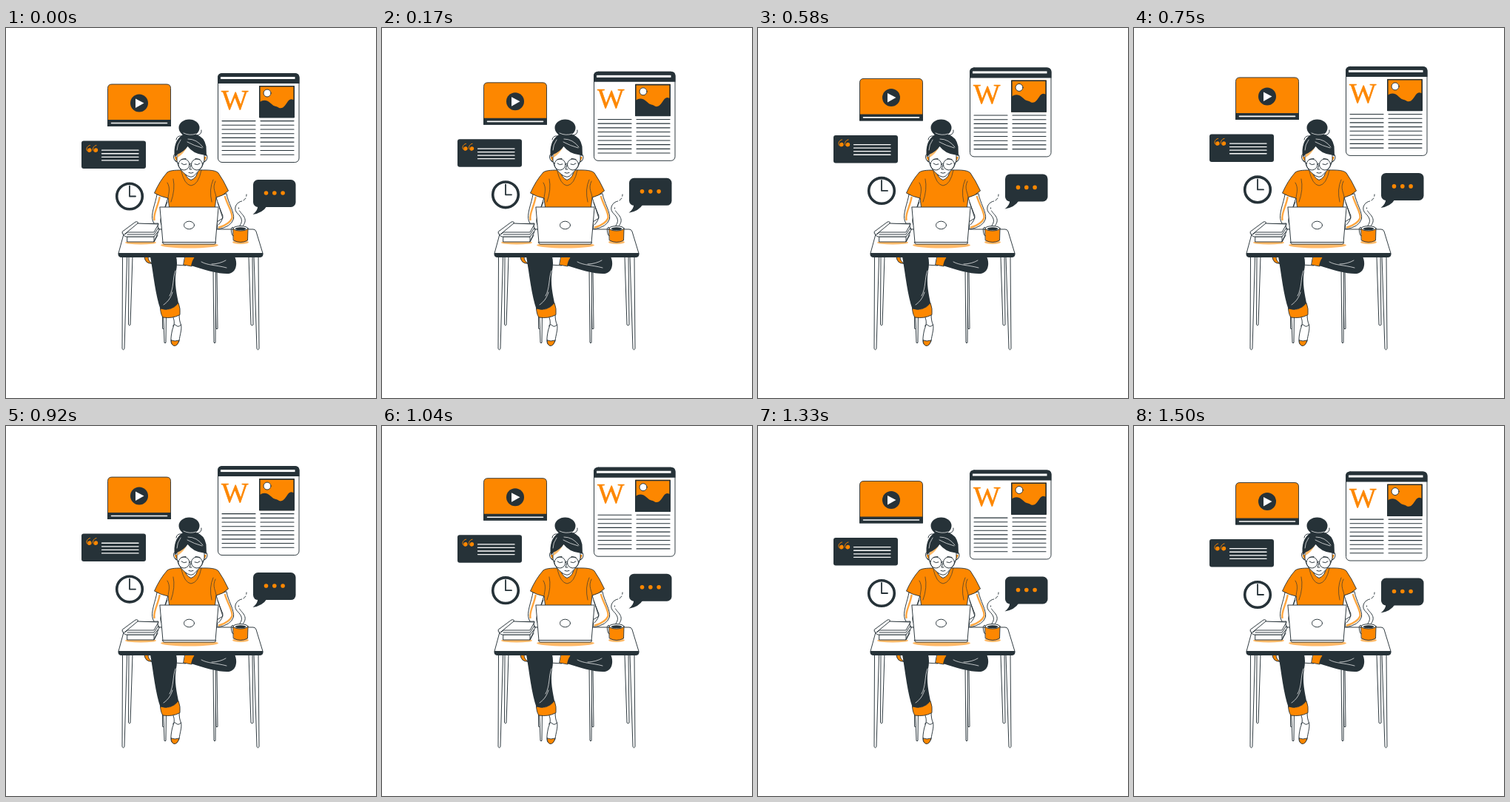
Animation of 500x500 px, one loop 1.54 s. Source, as an HTML page:

```html
<!DOCTYPE html>
<html lang="en">
<head>
<meta charset="utf-8">
<title>Working at a desk</title>
<style>
  html, body { margin: 0; width: 100%; height: 100%; overflow: hidden; background: #fff }
  svg { display: block; width: 100vw; height: 100vh; stroke-linecap: round; stroke-linejoin: round }
  .ink { fill: none; stroke: #263238; stroke-width: .95 }
  .thin { fill: none; stroke: #263238; stroke-width: .65 }
  .paper { fill: #fff; stroke: #263238; stroke-width: .95 }
  .fill { fill: #fd8700; stroke: #263238; stroke-width: .9 }
  .orange { fill: #fd8700 }
  .dark { fill: #263238 }
  .shade { fill: #ffb968 }
  .glow { fill: none; stroke: #ffa640; stroke-width: 2.4 }
  .light { fill: none; stroke: #fff; stroke-width: .7 }
  .white { fill: #fff }
</style>
</head>
<body>
<svg viewBox="0 0 500 500">
  <!-- table and chair legs -->
  <path class="paper" d="M166 309L165.500 401Q166.500 403 168 401L171 309M328 309L331 401Q332.500 403 334 401L333 309
    M211.500 380V406Q212.500 408 213.500 406L215 380M282 325L284 406Q285 408 286 406L285 325"/>
  <path class="paper" d="M212.500 380L214 425Q215 427 216 425L216.500 380M280 325L281 425Q282 427 283 425L283.500 325"/>
  <path class="paper" d="M157.500 309L157 433.500Q158.500 436 160 433.500L163.500 309M335 309L339 433.500Q340.500 436 342 433.500L341 309"/>

  <!-- legs -->
  <path class="paper" d="M187 309Q188 317 196 318L243 321V309Z"/>
  <path class="fill" d="M187 309H192Q192 315 197 318Q188 319 187 309Z"/>
  <path class="fill" d="M242 309H256L251 322L240 320Z"/>
  <path class="dark" d="M255 309H309C313 317 312 330 301 332C290 333 268 327 250 321Q251 315 255 309Z"/>
  <path class="light" d="M264 316C273 321 283 320 298 324M278 319C285 319 292 317 297 314"/>
  <path class="paper" d="M225 389C229 397 227 402 225 407C223 415 222 424 224 427Q230 432 234 423C235 414 238 407 236.500 401Q234 396 234 387Z"/>
  <path class="fill" d="M223.300 422Q228 424 233.800 422Q232 430 227 429.500Q223 428 223.300 422Z"/>
  <path class="ink" d="M225.500 403Q227 399 230 402Q233 405 236.500 401"/>
  <path class="dark" d="M195 309H230Q232 317 230 328C227 346 231 360 233.500 374Q221 382 209 381C202 362 199 331 195 309Z"/>
  <path class="light" d="M229 328C225 338 227 352 221 362M225 357C222 367 217 371 213 374"/>
  <path class="fill" d="M208.500 379Q223 384 233 371.500Q236 379 235 387.500Q225 393 212 391Q209 387 208.500 379Z"/>

  <!-- arms and shirt -->
  <path class="paper" d="M204 225C202 237 195 252 198.500 261Q202 270 212 274L214 262L211 254L219 229Z"/>
  <path class="paper" d="M298 224C300 236 309 249 307.500 258Q304 269 286 272L285 262L293 257L284 229Z"/>
  <path class="glow" d="M207.500 229C205.500 241 198.500 252 200.500 259M296 228C299 239 307 250 305.500 257Q302 265 288 269.500"/>
  <path class="ink" d="M218 235L211 254Q207 259 210 266M286 236L293 254Q293 260 287 266"/>
  <path class="fill" d="M240 192C231 192 222 192 218 195Q208 206 200.500 223Q209 228 219 230L221 246H282L284 229Q293 227 300.500 220Q294 206 287 196C283 191 268 192 260 192Z"/>
  <path class="paper" d="M240 191Q243 203 250 205.500Q258 203 260 191Z"/>
  <path class="thin" d="M236.500 192Q241 212 250 213Q260 212 264 192M218 209C223 217 219 225 219 230M226 204Q229 218 223 235M283 207C278 217 284 223 284 229M280 205Q274 218 278 235"/>

  <!-- head -->
  <path class="paper" d="M232 172Q226 168 226.500 175Q228 182 233 181M266 172Q272 168 272 175Q271 182 265 181"/>
  <path class="orange" d="M228 174L232 174V180Q228 179 228 174ZM270.500 174L267 174V180Q270 179 270.500 174Z"/>
  <path class="paper" d="M231 160V179C232 189 241 198 247 200.500Q250 202 253 200.500C260 194 267 187 268 178V160L249 152Z"/>
  <path class="shade" d="M232 170Q239 166 243 160L244.500 161Q240 170 232 175Z"/>
  <ellipse class="dark" cx="247.500" cy="135" rx="14" ry="11.500"/>
  <path class="dark" d="M239 144Q248 140 257 144Q268 147 270.500 160L271 173L267 171.500Q253 170 245.500 160Q241 167 231 171L228 175Q225 153 239 144Z"/>
  <path class="light" d="M236 151Q231 158 231 165M246 150Q258 150 266 161M245 154Q254 159 265 162M240 142Q248 146 257 143"/>
  <path class="ink" d="M237 146Q231 145 230 151M258 145Q265 144 264 138"/>
  <g class="ink">
    <circle cx="240.500" cy="184.500" r="7.500"/><circle cx="258" cy="184.500" r="7.500"/>
    <path d="M233 183L229 179M265.500 183L270 179M248 184Q249.300 182 250.500 184M237 183Q240 186 244 184M255 184Q259 186 262 183M237 177.500L243 176.500M256 176.500L262 177.500M250 185L248 191H251M247 195.500Q250 197 253 195.500"/>
  </g>

  <!-- table -->
  <path class="paper" d="M164 272H334Q337 272 338 275L347 304.500H152L160 275Q161 272 164 272Z"/>
  <path class="dark" d="M151.500 304.200H347.500V306Q347 310 343 310H156Q152 310 151.500 306Z"/>
  <ellipse class="shade" cx="248" cy="293.500" rx="39" ry="4"/>
  <ellipse class="shade" cx="182" cy="290" rx="21" ry="2.500"/>
  <ellipse class="shade" cx="317" cy="289.500" rx="11" ry="2.500"/>

  <!-- books -->
  <path class="paper" d="M164 282L170 275H206L200 289H164Z"/>
  <path class="ink" d="M164 282H200L206 272M200 282V289L205 280"/>
  <path class="paper" d="M160 276L174 265L206 264Q204 270 207 273L200 282H162Q157 280 158 276Z"/>
  <path class="paper" d="M157.500 275L175 262Q179 261 178 264L206 265L200 276L164 276Q160 281 157.500 278Z"/>
  <path class="ink" d="M178 264L161 278M164 279H200L206 270"/>

  <!-- laptop -->
  <path class="paper" d="M208 242H286.500Q287 242 287 243L283 290H212L208 243Z"/>
  <path class="paper" d="M211.500 289.500H283.500Q284 292 281 292H214Q211.500 292 211.500 289.500Z"/>
  <ellipse class="paper" cx="247.500" cy="266.500" rx="7" ry="5.300"/>

  <!-- mug -->
  <path class="ink" d="M307 269.500Q303.500 268 304.500 275Q305.500 282 308 281"/>
  <path class="fill" d="M307 271H327L326.500 287Q317 292 307.500 287Z"/>
  <ellipse class="paper" cx="317" cy="270.800" rx="10" ry="3.200"/>
  <ellipse class="dark" cx="317" cy="271.300" rx="7.500" ry="2"/>
  <path class="ink" d="M316 267C322 259 316 254 311.500 249C307 243 312 235 318.500 234M320.500 267C328 257 318 252 315.500 247"/>
  <path class="ink" stroke-dasharray="4 3" d="M314.500 244V243M321 233Q325 230 325 225"/>

  <g id="floating">
    <!-- video -->
    <path class="fill" d="M137.500 132V81.500Q137.500 76 143 76H217Q222.500 76 222.500 81.500V132Z"/>
    <path class="dark" d="M137 124H223V133H137Z"/>
    <path class="light" style="stroke-width:1.600" d="M142.500 128.500H217.500"/>
    <circle class="dark" cx="180" cy="101.500" r="12"/>
    <path class="white" d="M175 95.500L186.500 101.500L175 108Z"/>

    <!-- quote -->
    <rect class="dark" x="102" y="152.500" width="87" height="37.500" rx="3"/>
    <g id="quote">
      <circle class="orange" cx="113" cy="165" r="2.700"/>
      <path d="M113 167.500C108 168 107 160 113.500 158.500" fill="none" stroke="#fd8700"/>
    </g>
    <use href="#quote" x="8.500"/>
    <path id="quoteLines" class="light" style="stroke-width:1.300"/>

    <!-- clock -->
    <circle cx="167" cy="227.500" r="17.300" fill="#fff" stroke="#263238" stroke-width="3.600"/>
    <path class="ink" style="stroke-width:1.800" d="M167 213.500V227.500H175"/>

    <!-- article -->
    <rect class="paper" x="286.500" y="61.500" width="109.500" height="120" rx="5.500"/>
    <path class="dark" d="M286 75V67Q286 61 292 61H390.500Q396.500 61 396.500 67V75Z"/>
    <rect class="white" x="290" y="66" width="100.500" height="3"/>
    <text class="orange" x="291" y="109.700" font-size="38.500" font-family="'Liberation Serif', serif" stroke="#fd8700" stroke-width=".6">W</text>
    <rect class="orange" x="342" y="78" width="48" height="43"/>
    <circle class="paper" cx="353" cy="88" r="5"/>
    <path class="dark" d="M342 101C347 96 353 97 358 102S365 105 369 108C375 110 378 103 381 99S387 96 390 98V121H342Z"/>
    <rect class="ink" style="stroke-width:1.600" x="342.800" y="78.800" width="46.400" height="41.800"/>
    <path id="articleLines" class="ink" style="stroke-width:1.100"/>

    <!-- speech bubble -->
    <rect class="dark" x="334" y="205" width="57.500" height="37" rx="6.500"/>
    <path class="dark" d="M340 240Q341 246 333.500 252Q347 250 353 240Z"/>
    <path d="M351.500 223h0m11.300 0h0m11.300 0h0" fill="none" stroke="#fd8700" stroke-width="5.600"/>
  </g>
</svg>
<script>
  const byId = id => document.getElementById(id);
  const rules = (x, y, width, gap, count) =>
    Array.from({ length: count }, (_, i) => `M${x} ${y + i * gap}h${width}`).join('');
  byId('quoteLines').setAttribute('d', rules(129.5, 165.2, 49.5, 4.55, 4));
  byId('articleLines').setAttribute('d', rules(292, 125.6, 45, 5.7, 9) + rules(344, 125.6, 45, 5.7, 9));

  const LOOP = 1540, FPS = 24, HEIGHT = 10, LEAD = 45;

  // Constant-speed rise and fall, stepped at 24 pictures per second.
  function lift(ms) {
    const step = Math.floor((ms % LOOP + 4) * FPS / 1000);
    const phase = (step * 1000 / FPS + LEAD) / LOOP % 1;
    return 0.58 - HEIGHT * (1 - Math.abs(1 - 2 * phase));
  }

  const start = performance.now();
  function draw() {
    byId('floating').setAttribute('transform', `translate(0 ${lift(performance.now() - start).toFixed(2)})`);
    requestAnimationFrame(draw);
  }
  draw();
</script>
</body>
</html>
```
